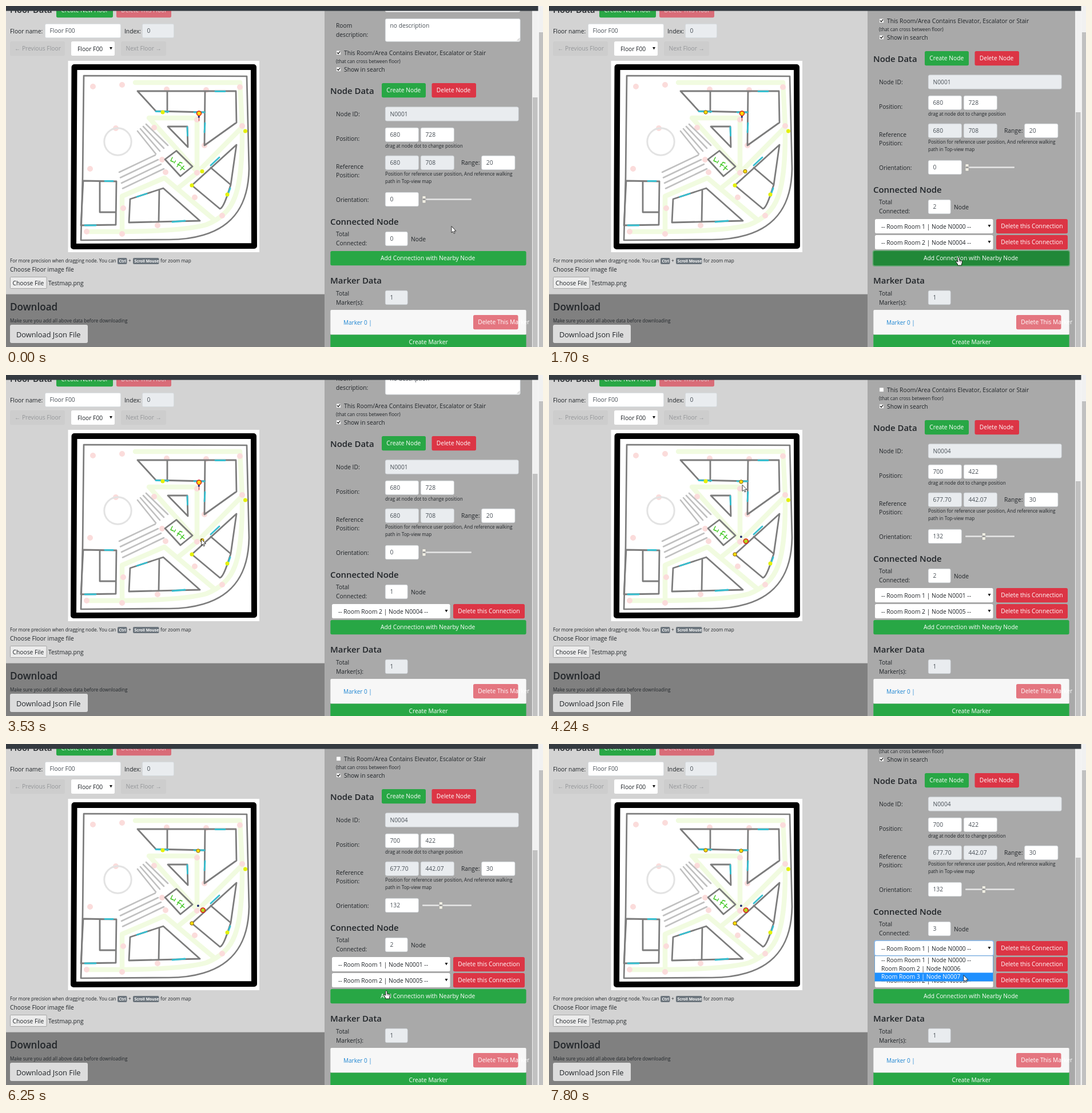
These frames come from a looping animation (939x597 px, 8 s). An HTML page:

```html
<!DOCTYPE html>
<html lang="en">
<head>
<meta charset="utf-8">
<title>Floor editor</title>
<style>
html, body { margin: 0; width: 100%; height: 100%; overflow: hidden; }
svg { display: block; width: 939px; height: 597px; font-family: "Open Sans", "Noto Sans", sans-serif; }
</style>
</head>
<body>
<svg viewBox="0 0 939 597">
  <g id="base"></g><g id="live"></g><g id="chrome"></g><g id="cursor"></g>
</svg>
<script>
const INK = '#212529', FIELD = '#495057', GREEN = '#28a745', RED = '#dc3545', OFF = '#e9ecef', WALL = '#7c7c7c';
const LINE = 28;   // height of one connection row
const $ = id => document.getElementById(id);
const times = (n, fn) => Array.from({ length: n }, (_, i) => fn(i)).join('');

// ---- markup helpers ----
const rect = (x, y, w, h, fill, r = 0, extra = '') =>
  `<rect x="${x}" y="${y}" width="${w}" height="${h}" rx="${r}" fill="${fill}" ${extra}/>`;
const text = (x, y, s, size = 10.25, fill = INK, weight = 400) =>
  `<text x="${x}" y="${y}" font-size="${size}" fill="${fill}" font-weight="${weight}">${s}</text>`;
const small = (x, y, s) => text(x, y, s, 8.17);
const head = (x, y, s, size = 14.9) => text(x, y, s, size, INK, 600);
const path = (d, color, w, fill = 'none') =>
  `<path d="${d}" fill="${fill}" stroke="${color}" stroke-width="${w}" stroke-linecap="round" stroke-linejoin="round"/>`;
const dot = (x, y, r, fill, stroke = 'none', w = 1) =>
  `<circle cx="${x}" cy="${y}" r="${r}" fill="${fill}" stroke="${stroke}" stroke-width="${w}"/>`;
const button = (x, y, w, s, fill, tx = x + 8.3, color = '#fff') =>
  rect(x, y, w, 25.3, fill, 2.7) + text(tx, y + 16.3, s, 10.25, color);
const input = (x, y, w, s, fill = '#fff', h = 25) =>
  rect(x + .35, y + .35, w - .7, h - .7, fill, 2.5, 'stroke="#ced4da" stroke-width=".7"') +
  text(x + 8.5, y + 16.2, s, 10.25, FIELD);
const select = (x, y, w, s) => rect(x, y, w, 25, '#fff', 2.5) + text(x + 11, y + 16.5, s) +
  `<path d="M${x + w - 9} ${y + 10}h5l-2.5 4.5z" fill="#111"/>`;
const check = (y, on) => rect(577.7, y, 7.6, 7.6, '#fff', 1, 'stroke="#a0a0a0" stroke-width=".7"') +
  (on ? path(`M579.4 ${y + 3.8}l1.6 1.8 2.8-3.8`, '#222', 1.4) : '');
const key = (x, w, s) => rect(x, 441, w, 11, '#6c757d', 2) + text(x + 2.4, 449, s, 6.8, '#fff', 700);

// ---- floor plan ----
function floorMap() {
  const stairs = times(4, i =>
    `M${230 + 5 * i} ${219 - 4 * i}l${32 + 2 * i} ${40 - i}M${198 + 2 * i} ${291 + 9.5 * i}L${261 + 5 * i} ${261 + 8 * i}`);
  return rect(108.5, 96, 334.5, 335, '#fff') +
    path('M119.5 107H433L434 420 118 421Z', '#000', 10) +
    // walkways
    path('M226 134H409L413 210Q414 300 400 335 388 368 350 383 310 394 203 395H141M203 397V333L277 301 364 374' +
      'M302 318L334 292 413 212M250 196H334V290L252 198', '#f1fbe0', 8.5) +
    // beacons: zero-length strokes with round caps
    path('M152 141h0M203 138h0M281 146h0M350 147h0M409 142h0M192 214h0M259 213h0M334 199h0M413 210h0M347 244h0' +
      'M273 269h0M279 291h0M334 292h0M147 285h0M141 395h0M205 354h0M203 399h0M265 384h0M330 335h0M378 367h0', '#fbdcdb', 10) +
    dot(195.5, 237.5, 23.7, 'none', '#e3e3e3', 3) +
    path(stairs, '#c0c0c0', 2.6) +
    // outer wall, then rooms
    path('M136 122L421 123 425 285C424 345 400 385 345 401 325 407 300 409 285 409L131 410 134 300Z', WALL, 2.7) +
    path('M230 149H402L403 204 347 244 348 150M230 149L262 184 348 186M282 149V186M283 211H317L318 247Z' +
      'M403 243L393 313 386 334Q379 354 374 355L325 314ZM358 283L393 313' +
      'M217 338L275 319 339 376 215 379ZM268 322L267 378' +
      'M131 384L135 306 193 307 192 383ZM164 307V361H191M298 253.5L326 281 305 298 278 268.5Z', WALL, 2.8) +
    // doors
    path('M366 149.5h17M348 205l-1 16M262 184.5l22 .5M329 186h18M317 212l.5 15M358 279l15-14M387 333l5-14' +
      'M229 334l17-5.5M291 378l22-2M173 306.5h14M138 384h19', '#36bfd0', 2.8) +
    // handwritten lift label
    path('M291 265l-3 6 5 2M296.500 271l-2.500 4M308 275l-4-1.500-5 8M300 277l5 2.500M311 280l-6 7M306 281.500l6 5', '#37c417', 1.4);
}

function background() {
  return rect(0, 0, 557, 504.5, '#d3d3d3') + rect(0, 504.5, 557, 93, '#808080') + rect(557, 0, 363, 597, '#a9a9a9') +
    head(7, 11.5, 'Floor Data', 14.7) +
    button(88, -5, 99, 'Create New Floor', GREEN) +
    button(193, -5, 96, 'Delete This Floor', '#d96c78', 201.3, '#f0dcde') +
    text(7, 47.5, 'Floor name:') + input(68, 31, 133, 'Floor F00') +
    text(207, 47.5, 'Index:') + input(238, 31, 56, '0', OFF) +
    button(7, 62, 96, '← Previous Floor', '#cdcdcd', 15, '#95979a') +
    select(114, 62, 76, 'Floor F00') +
    button(201, 62, 79, 'Next Floor →', '#cdcdcd', 209.5, '#95979a') +
    floorMap() +
    small(7, 449, 'For more precision when dragging node. You can') + key(195, 16.5, 'Ctrl') +
    small(214, 449, '+') + key(222, 45.5, 'Scroll Mouse') + small(270, 449, 'for zoom map') +
    text(7, 465, 'Choose Floor image file') +
    rect(7.5, 474.5, 63.5, 20, '#ececec', 1, 'stroke="#999" stroke-width=".8"') +
    text(11.5, 488.5, 'Choose File') + text(74, 488.5, 'Testmap.png') +
    head(7, 533, 'Download', 17.1) +
    small(7, 554, 'Make sure you add all above data before downloading') +
    rect(7, 558, 136, 32, '#dcdcdc', 3) + text(18, 579.5, 'Download Json File', 12.8) +
    head(567, 486, 'Marker Data') + text(577, 507, 'Total') + text(577, 523, 'Marker(s):') + input(663, 498, 39.5, '1', OFF) +
    rect(567.3, 532, 342.3, 43.5, '#f7f7f7', 2) + text(590, 557.5, 'Marker 0 |', 10, '#1f86d2') +
    button(817, 541, 78.5, 'Delete This Marker', '#e47680') +
    rect(567.3, 575.5, 342.3, 26, GREEN) + text(704.5, 592, 'Create Marker', 10.25, '#fff');
}

// ---- timeline ----
const LOOP = 8000, FIRST_ADD = 770, REMOVE = 2690, LAST_ADD = 6410, OPEN = 7250;
const STATES = [
  { at: 0, sel: 1, links: [] },
  { at: 930, sel: 1, links: [0] },
  { at: 1310, sel: 1, links: [0, 4] },
  { at: REMOVE, sel: 1, links: [4] },
  { at: 3700, sel: 4, links: [1, 5] },
  { at: 4310, sel: 1, links: [4] },
  { at: 5080, sel: 4, links: [1, 5] },
  { at: LAST_ADD, sel: 4, links: [0, 1, 5] }
];
// pointer moves: start, end, goal
const MOVES = [[160, 380, 735, 450], [460, 770, 708, 442], [1230, 1700, 716, 440], [1930, 2440, 868, 388],
  [2760, 3530, 341.5, 287.5], [3700, 4300, 338, 190], [4460, 4930, 344.5, 294], [5460, 6250, 665, 432],
  [LAST_ADD, 7180, 722, 357], [OPEN, 7800, 725, 405]];

function pointer(t) {
  let x = 779, y = 386;
  for (const [a, b, gx, gy] of MOVES) {
    const p = Math.min(1, Math.max(0, (t - a) / (b - a))), k = p * p * (3 - 2 * p);
    x += (gx - x) * k;
    y += (gy - y) * k;
  }
  return [x, y];
}
const rowTop = (i, n) => 401 - LINE * (n - 1 - i);

// what button lies under the pointer: 'add', a row number, or null
function hit([x, y], n) {
  if (x > 567 && x < 910 && y > 429 && y < 454.5) return 'add';
  const i = Math.floor((y - rowTop(0, n)) / LINE);
  return x > 782 && x < 907 && i >= 0 && i < n ? i : null;
}

// ---- changing parts ----
const NODES = { 0: [274, 186], 1: [336, 187], 3: [418.5, 219], 4: [343, 289.5], 5: [325, 314], 6: [387, 330] };
const DATA = {
  1: { pos: [680, 728], ref: ['680', '708'], range: 20, angle: 0 },
  4: { pos: [700, 422], ref: ['677.70', '442.07'], range: 30, angle: 132 }
};
const roomNode = id => `Room Room ${id < 4 ? 1 : 2} | Node N000${id}`;

function nodes(sel, links) {
  let out = '';
  for (const id in NODES) {
    const [x, y] = NODES[id];
    if (+id === sel)   // selected node with its reference point
      out += sel === 1
        ? path('M337.5 193V201', '#c0392b', 1) + dot(337.3, 194, 1.7, '#14206e') + dot(x + 1.5, y + 1, 4, '#ffd60a', '#d81818', 1.5)
        : rect(334.2, 281.6, 3.4, 3.4, '#14206e', 1) + dot(x + 1.3, y + 1.5, 4, '#b5d81e', '#e01818', 1.6);
    else
      out += links.includes(+id) ? dot(x, y, 3.2, '#f8dc08', '#8a6410') : dot(x, y, 3.5, '#e4f00a');
  }
  return out;
}

function form(sel, n) {
  const { pos, ref, range, angle } = DATA[sel], thumb = 728 + angle / 360 * 80;
  const pair = (y, values, fill) => values.map((v, i) => input(663 + 62 * i, y, 58.7, v, fill)).join('');
  return `<g transform="translate(0 ${-LINE * n})">` +
    rect(663, -15, 236, 25.5, '#fff', 2.5) +
    text(577, 38, 'Room') + text(577, 54, 'description:') +
    input(663, 22, 236.5, 'no description', '#fff', 40.5) + path('M894 60.5l4-4M896.5 60.5l1.5-1.5', '#888', .7) +
    check(78, sel === 1) + text(591, 86, 'This Room/Area Contains Elevator, Escalator or Stair') +
    small(577, 99.5, '(that can cross between floor)') +
    check(107, true) + text(591, 115, 'Show in search') +
    head(567, 153.5, 'Node Data') + button(657, 135, 77, 'Create Node', GREEN) + button(744.5, 135, 77.5, 'Delete Node', RED) +
    text(577, 193, 'Node ID:') + input(663, 176.5, 233.5, 'N000' + sel, OFF) +
    text(577, 235.5, 'Position:') + pair(212.8, pos) +
    small(663, 247.5, 'drag at node dot to change position') +
    text(577, 284.5, 'Reference') + text(577, 300, 'Position:') + pair(261.8, ref, OFF) +
    text(796, 278, 'Range:') + input(831.3, 261.8, 59, range) +
    small(663, 297, 'Position for reference user position, And reference walking') + small(663, 309.5, 'path in Top-view map') +
    text(577, 342.5, 'Orientation:') + input(663, 326, 58.7, angle) +
    rect(728, 337.2, 86, 2.6, '#e6e6e6', 1) +
    rect(thumb, 332.5, 6, 12.5, '#f1efe4', 1, 'stroke="#999" stroke-width=".7"') + path(`M${thumb + 2} 338.5h2`, '#999', 3) +
    head(567, 383, 'Connected Node') + text(577, 403, 'Total') + text(577, 419, 'Connected:') +
    input(663, 395, 39.5, n) + text(708, 411.5, 'Node') + '</g>';
}

function dropdown(first, y) {
  const h = 14.7, pick = Math.min(2, Math.max(0, Math.floor((y - 371) / h)));
  const names = [`-- ${roomNode(first)} --`, 'Room Room 2 | Node N0006', 'Room Room 3 | Node N0007'];
  return rect(569.5, 370.8, 207, 44.5, '#fff', 0, 'stroke="#5b9bd5" stroke-width=".9"') +
    rect(570, 371 + pick * h, 206, h, '#1e90ff') +
    names.map((s, i) => text(581, 382 + i * h, s, 10.25, i === pick ? '#fff' : INK)).join('');
}

function live(t, { sel, links }) {
  const n = links.length, open = t >= OPEN;
  const hot = hit(pointer(t - 90), n);   // hover colour lags slightly
  const focus = (t >= FIRST_ADD && t < REMOVE) || (t >= LAST_ADD && !open);
  let out = nodes(sel, links) + form(sel, n);
  links.forEach((id, i) => {
    const y = rowTop(i, n);
    if (open && i === 0) out += rect(568.5, y - 1.5, 209.5, 28, '#80bdff', 4, 'opacity=".8"');
    out += select(570, y, 206.5, `-- ${roomNode(id)} --`) +
      button(782, y, 125, 'Delete this Connection', hot === i ? '#c82333' : RED);
  });
  if (focus) out += rect(565.6, 427.6, 345.5, 28.4, GREEN, 4, 'opacity=".5"');
  out += button(567.3, 429, 342.3, 'Add Connection with Nearby Node', hot === 'add' ? '#218838' : GREEN, 655);
  if (open) out += dropdown(links[0], pointer(t)[1]);
  const top = 160 + 13 * n;
  return out + rect(920, 9, 10.5, 588, '#f1f1f1') + rect(921, top, 8.5, 597 - top, '#c1c1c1');
}

const ARROW = path('M0 0V10.8L2.5 8.6 4.2 12.3 6 11.5 4.3 8H7.6Z', '#111', .8, '#fff');
const HAND = path('M-1.3 .8Q0-1 1.3 .8V5L5.6 6Q7 6.5 6.5 9L5.5 12V14H-1.5V12L-4.5 8Q-4.5 6-2.8 7L-1.3 8Z', '#111', .9, '#fff') +
  path('M2 8V5.5M4 8.5V6', '#111', .6);

$('base').innerHTML = background();
$('chrome').innerHTML = rect(930.5, 0, 9, 597, '#f1f1f1') + rect(932, 46, 7, 551, '#c1c1c1') + rect(0, 0, 930.5, 8.6, '#343a40');

let shown = '';
function frame(now) {
  const t = now % LOOP, state = STATES.filter(s => s.at <= t).pop();
  const at = pointer(t), html = live(t, state);
  if (html !== shown) $('live').innerHTML = shown = html;
  $('cursor').innerHTML = t < OPEN && hit(at, state.links.length) !== null ? HAND : ARROW;
  $('cursor').setAttribute('transform', `translate(${at})`);
  requestAnimationFrame(frame);
}
frame(performance.now());
</script>
</body>
</html>
```
